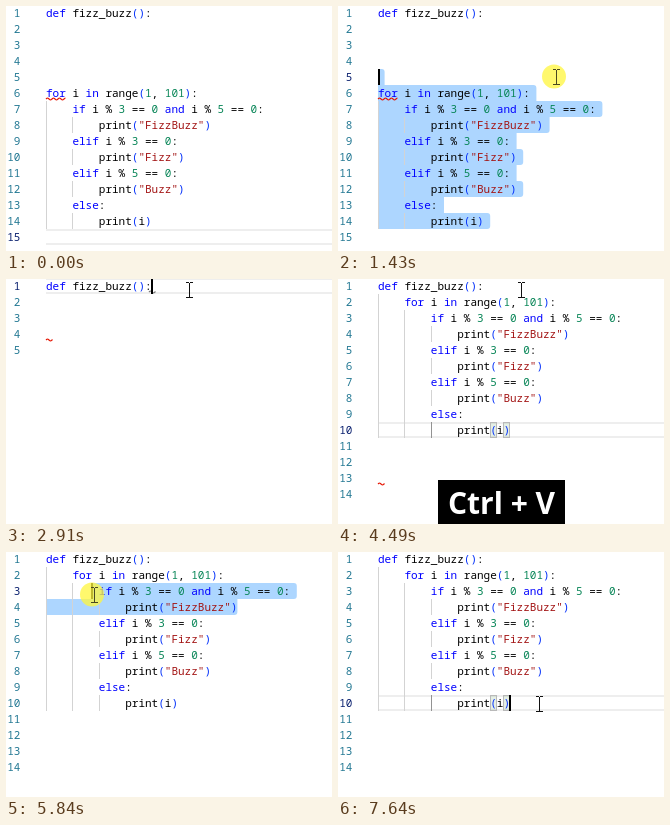
Recreate the animation shown at these times as an HTML page with a canvas. Size 326 by 245 pixels, loop 8000 ms.

```html
<!DOCTYPE html>
<html lang="en">
<head>
<meta charset="utf-8">
<title>Moving a loop into a function</title>
<style>
  html, body { margin: 0; width: 100%; height: 100%; overflow: hidden; background: #fff; }
  canvas { display: block; width: 326px; height: 245px; }
</style>
</head>
<body>
<canvas id="stage"></canvas>
<script>
const W = 326, H = 245, LOOP = 8000;
const LEFT = 40, CHAR = 6.6, ROW = 16;
const canvas = document.getElementById('stage');
const ctx = canvas.getContext('2d');
const dpr = window.devicePixelRatio || 1;
canvas.width = W * dpr;
canvas.height = H * dpr;

const head = 'def fizz_buzz():';
const body = [
  'for i in range(1, 101):',
  '    if i % 3 == 0 and i % 5 == 0:',
  '        print("FizzBuzz")',
  '    elif i % 3 == 0:',
  '        print("Fizz")',
  '    elif i % 5 == 0:',
  '        print("Buzz")',
  '    else:',
  '        print(i)'
];
const blanks = n => Array(n).fill('');
const before = [head, ...blanks(4), ...body, ''];
const cut = [head, ...blanks(4)];
const opened = [head, '    ', ...blanks(4)];
const pasted = [head, ...body.map(s => '    ' + s), ...blanks(4)];

const CUT = 1910, CLICK = 2740, ENTER = 3140, PASTE = 3990;
const DRAG = 5190, DROP = 5810, END_CLICK = 7570;

// Pointer path: time, x, y, eased arrival
const path = [
  [300, 274, 243], [470, 262, 235], [630, 262, 235], [1110, 240, 139], [1430, 218, 71],
  [2230, 218, 71], [2580, 183, 11, 1], [4500, 183, 11], [4980, 243, 56, 1],
  [DRAG, 243, 56], [5840, 88, 43, 1], [7010, 88, 43], [7420, 201, 152, 1]
];
const presses = [[630, 1680], [CLICK, 2910], [DRAG, 6220], [END_CLICK, 7640]];
const keys = [[1940, 'Ctrl + X', 127], [ENTER, 'Enter', 93], [4020, 'Ctrl + V', 127], [6580, 'Ctrl + C', 125]];

const within = (t, a, b) => t >= a && t < b;
const colX = col => LEFT + col * CHAR;
const rowY = line => ROW * (line - 1) - 1;

function pointerAt(t) {
  if (t < path[0][0]) return null;
  const i = path.findIndex(p => p[0] > t);
  if (i < 0) return path[path.length - 1].slice(1, 3);
  const [t0, x0, y0] = path[i - 1], [t1, x1, y1, eased] = path[i];
  let k = (t - t0) / (t1 - t0);
  if (eased) k = k * k * (3 - 2 * k);
  return [x0 + (x1 - x0) * k, y0 + (y1 - y0) * k];
}

function docAt(t) {
  return t < CUT ? before : t < ENTER ? cut : t < PASTE ? opened : pasted;
}

// Text position under the pointer, slightly behind it
function hit(t, doc) {
  const [x, y] = pointerAt(t - 35);
  const line = Math.min(doc.length, Math.floor((y + 1) / ROW) + 1);
  const col = Math.min(doc[line - 1].length, Math.max(0, Math.round((x - LEFT) / CHAR)));
  return { line, col };
}

// Caret position, blink start and fixed end of the selection
function caretAt(t, doc) {
  if (t < 630) return { line: 15, col: 0, hidden: true };
  if (t < CUT) return { ...hit(t, doc), since: t, anchor: { line: 15, col: 0 } };
  if (t < CLICK) return { line: 5, col: 0, since: 1940 };
  if (t < ENTER) return { line: 1, col: head.length, since: CLICK };
  if (t < PASTE) return { line: 2, col: 4, since: ENTER };
  if (t < DRAG) return { line: 10, col: 20, since: PASTE };
  if (t < END_CLICK) return { ...hit(t, doc), since: Math.min(t, DROP), anchor: { line: 4, col: 29 } };
  return { line: 10, col: 20, since: END_CLICK };
}

function rect(color, x, y, w, h) {
  ctx.fillStyle = color;
  ctx.fillRect(x, y, w, h);
}

// Right-hand corners are rounded where they stick out past the neighbouring row
function drawSelection(doc, from, to) {
  const endOf = n => n < from.line || n > to.line ? 0 : n === to.line ? to.col : doc[n - 1].length + 1;
  ctx.fillStyle = '#add6ff';
  for (let n = from.line; n <= to.line; n++) {
    const a = n === from.line ? from.col : 0, b = endOf(n);
    if (b <= a) continue;
    const corner = m => endOf(m) < b ? 3 : 0;
    ctx.beginPath();
    ctx.roundRect(colX(a), rowY(n), (b - a) * CHAR, ROW, [0, corner(n - 1), corner(n + 1), 0]);
    ctx.fill();
  }
}

function tokenColor(s) {
  if (/^(def|for|in|if|and|elif|else)$/.test(s)) return '#0000ff';
  if (s[0] === '"') return '#a31515';
  if (/^\d/.test(s)) return '#098658';
  if (/[()]/.test(s)) return '#0431fa';
  return '#000';
}

function drawLine(text, n, current) {
  const base = ROW * n - 5;
  const indent = text.trim() ? text.search(/\S/) : 0;
  for (let c = 0; c < indent; c += 4) {
    const active = current && c === indent - 4 && c >= 8;
    rect(active ? '#939393' : '#d3d3d3', Math.round(colX(c)), rowY(n), 1, ROW);
  }
  ctx.textAlign = 'right';
  ctx.fillStyle = current ? '#0b216f' : '#237893';
  ctx.fillText(n, 14.4, base);
  ctx.textAlign = 'left';
  for (const m of text.matchAll(/"[^"]*"|\w+|[^\s\w"]/g)) {
    ctx.fillStyle = tokenColor(m[0]);
    ctx.fillText(m[0], colX(m.index), base);
  }
}

function squiggle(line, col, chars, color) {
  const x0 = colX(col), x1 = x0 + chars * CHAR, y = rowY(line) + 14;
  ctx.beginPath();
  for (let x = x0; x <= x1; x += 0.5) ctx.lineTo(x, y - Math.sin((x - x0) * Math.PI / 3));
  ctx.strokeStyle = color;
  ctx.lineWidth = 1.1;
  ctx.stroke();
}

function drawSquiggles(t) {
  const red = '#e51400', grey = '#777';
  if (t < CUT) squiggle(6, 0, 3, red);
  if (within(t, 1970, PASTE)) squiggle(1, 15.6, 1, grey);
  if (within(t, 1970, 2500)) squiggle(5, 0, 1, grey);
  if (within(t, 2500, 4700)) squiggle(t < ENTER ? 4 : t < PASTE ? 5 : 13, 0, 1, red);
}

function drawPointer(t) {
  const p = pointerAt(t);
  if (!p) return;
  const [x, y] = p.map(Math.round);
  const pressed = presses.some(([a, b]) => within(t, a, b));
  if (pressed) {
    ctx.fillStyle = 'rgba(255,245,60,0.75)';
    ctx.beginPath();
    ctx.arc(x - 2, y - 0.5, 12, 0, 7);
    ctx.fill();
  }
  const ink = pressed ? '#4a4820' : '#111';
  rect(ink, x, y - 7, 1, 15);
  for (const end of [-8, 7]) {
    rect(ink, x - 3, y + end, 3, 1);
    rect(ink, x + 1, y + end, 3, 1);
  }
}

function drawKeys(t) {
  const key = keys.find(([a]) => within(t, a, a + 500));
  if (!key) return;
  const [, label, w] = key;
  rect('#000', 163.5 - w / 2, 201, w, 44);
  ctx.font = 'bold 30px "Open Sans", "Noto Sans", sans-serif';
  ctx.textAlign = 'center';
  ctx.fillStyle = '#fff';
  ctx.fillText(label, 163.5, 235);
}

function draw(t) {
  ctx.setTransform(dpr, 0, 0, dpr, 0, 0);
  rect('#fff', 0, 0, W, H);
  const doc = docAt(t), caret = caretAt(t, doc), anchor = caret.anchor;
  const selecting = anchor && (anchor.line !== caret.line || anchor.col !== caret.col);

  if (selecting) {
    drawSelection(doc, caret, anchor);
  } else {
    rect('#eee', LEFT, rowY(caret.line), W - LEFT, 2);
    rect('#eee', LEFT, rowY(caret.line) + 14, W - LEFT, 2);
  }
  if (caret.line === 10 && !selecting) {
    ctx.strokeStyle = '#b9b9b9';
    ctx.lineWidth = 1;
    for (const c of [17, 19]) {
      const x = Math.round(colX(c));
      rect('rgba(0,100,0,0.1)', x, rowY(10), 7, ROW);
      ctx.strokeRect(x + 0.5, rowY(10) + 0.5, 6, 15);
    }
  }

  ctx.font = '11px "Noto Sans Mono", "DejaVu Sans Mono", monospace';
  doc.forEach((text, i) => drawLine(text, i + 1, i + 1 === caret.line));
  drawSquiggles(t);

  const lit = Math.floor((t - caret.since) / 500) % 2 === 0;
  if (lit && !caret.hidden) {
    rect('#000', Math.max(LEFT, Math.round(colX(caret.col)) - 1), rowY(caret.line), 2, ROW);
  }
  drawPointer(t);
  drawKeys(t);
}

const start = performance.now();
function tick() {
  draw((performance.now() - start) % LOOP);
  requestAnimationFrame(tick);
}
tick();
</script>
</body>
</html>
```
